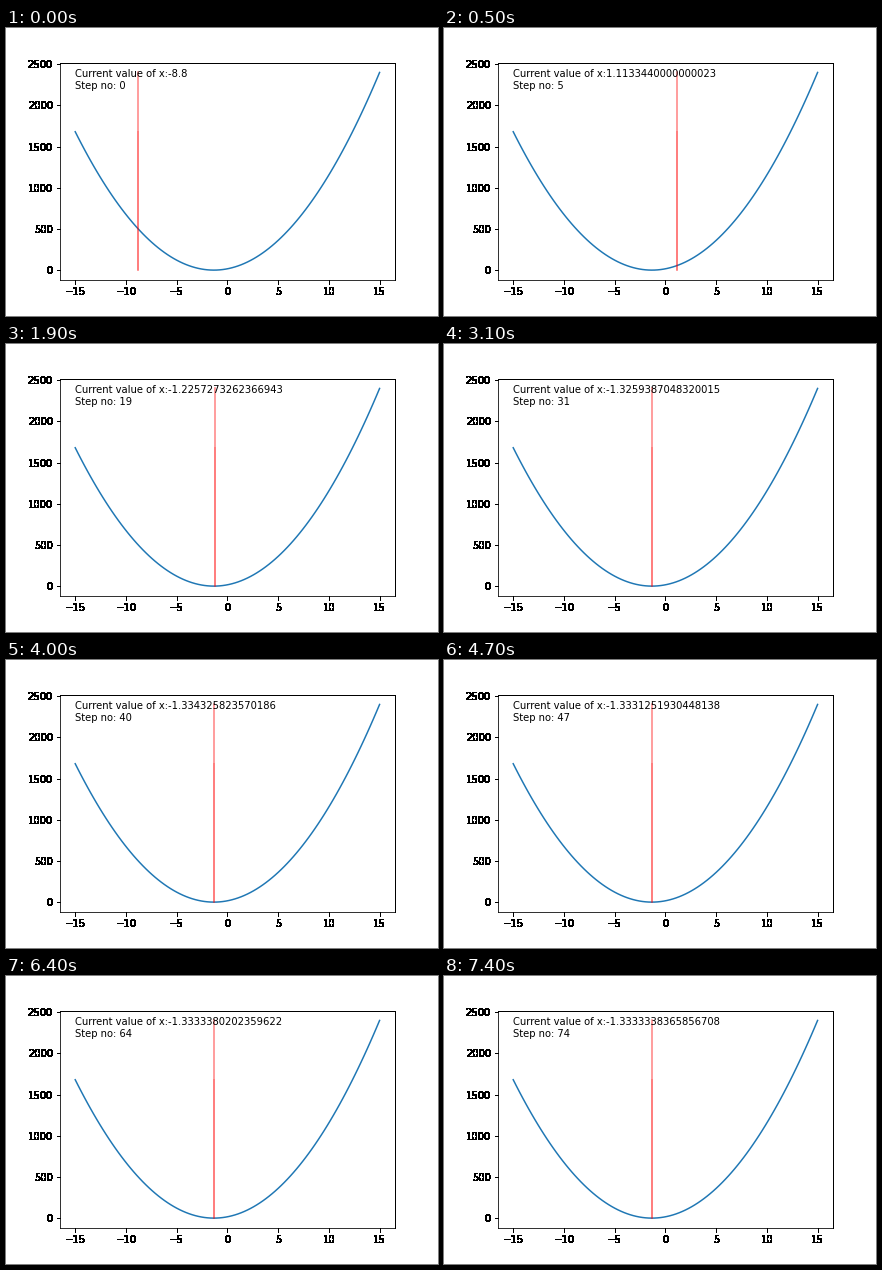
A matplotlib script for the animation above (7.5 s loop, 432x288 px).

```python
import numpy as np
import matplotlib.pyplot as plt
from matplotlib.animation import FuncAnimation

STEPS = 75
RATE = 0.1


def f(x):
    return (3 * x + 4) ** 2


def slope(x):
    return 2 * (3 * x + 4) * 3


def descend(x, steps):
    path = []
    for _ in range(steps):
        x = x - RATE * slope(x)
        path.append(x)
    return path


def harden(img, dpi):
    """Turn every touched pixel solid black: no antialiasing."""
    out = np.zeros_like(img)
    out[..., 3] = img[..., 3] > 0
    return out, 0, 0


plt.rcParams["font.family"] = "DejaVu Sans"
fig = plt.figure(figsize=(6, 4), dpi=72, facecolor="white")
ax = fig.add_axes([0.125, 0.125, 0.775, 0.755])

xs = np.linspace(-15, 15, 100)
ys = f(xs)
ax.plot(xs, ys)
ax.set_xlim(ax.get_xlim())
ax.set_ylim(ax.get_ylim())

for part in (ax.xaxis, ax.yaxis, ax.spines["right"], ax.spines["top"]):
    part.set_agg_filter(harden)

# The marker runs down and back up through all curve heights.
marker, = ax.plot([], [], color="r", alpha=0.5)
label = ax.text(-15, 2200, "", fontsize=10)
path = descend(8, STEPS)


def update(i):
    marker.set_data(np.full_like(ys, path[i]), ys)
    label.set_text(f"Current value of x:{path[i]}\nStep no: {i}")
    return marker, label


anim = FuncAnimation(fig, update, frames=STEPS, interval=100, repeat=True)
plt.show()
```
